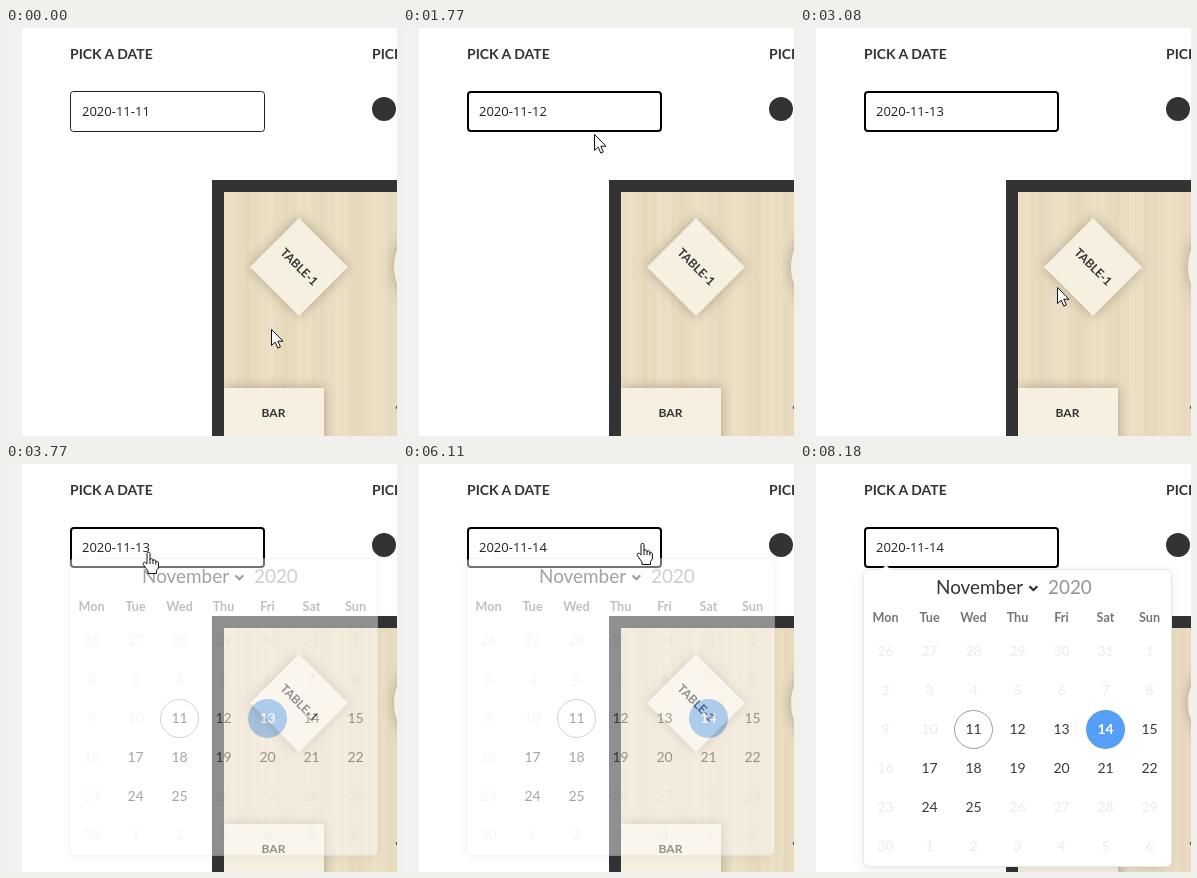
An HTML page for the animation above (8410 ms loop, 391 px wide and 408 px high).

```html
<!DOCTYPE html>
<html lang="en">
<head>
<meta charset="utf-8">
<title>Date picker</title>
<style>
  html, body { margin: 0; height: 100%; overflow: hidden; background: #fff; }
  svg { display: block; width: 391px; height: 408px; }
  text { font-family: Lato, sans-serif; fill: #333; }
  .mid { text-anchor: middle; }
  .title { font-size: 14px; font-weight: 700; }
  .label { font-size: 12px; font-weight: 700; }
  .furniture { fill: #f6f0e1; filter: drop-shadow(0 0 6px rgba(40, 30, 10, .3)); }
  #value { font: 13px "Open Sans", sans-serif; fill: #222; }
  .head { font-size: 18.9px; }
  .weekday { font-size: 12.6px; font-weight: 700; fill: #757575; }
  .day { font-size: 14px; fill: #393939; }
  .off { fill-opacity: .1; }
  .chosen { fill: #fff; font-weight: 700; }
  .panel { filter: drop-shadow(0 3px 6px rgba(0, 0, 0, .08)); }
</style>
</head>
<body>
<svg viewBox="0 0 391 408">
  <rect width="16" height="408" fill="#f1f1f1"/>
  <text class="title" x="64" y="31">PICK A DATE</text>
  <text class="title" x="366" y="31">PICK</text>
  <circle cx="378" cy="81" r="12" fill="#333"/>

  <rect x="206" y="152" width="185" height="256" fill="#333335"/>
  <g id="floor" shape-rendering="crispEdges"></g>
  <path class="furniture" d="M293 190l49 49-49 49-49-49z"/>
  <text class="label mid" transform="translate(293 239) rotate(45)" y="4">TABLE-1</text>
  <circle class="furniture" cx="437" cy="239" r="49"/>
  <rect class="furniture" x="218" y="360" width="100" height="60"/>
  <rect x="206" y="340" width="12" height="68" fill="#333335"/>
  <text class="label mid" x="267.5" y="389">BAR</text>
  <path d="M391 378l-1 1 1 2" stroke="#444" fill="none"/>

  <rect id="field" rx="3" fill="#fff"/>
  <text id="value" x="76" y="88"></text>

  <g id="calendar">
    <rect class="panel" x="63.5" y="105.5" width="308" height="297" rx="5" fill="#fff" stroke="#e6e6e6"/>
    <path d="M81 106l5-5 5 5z" fill="#fff"/>
    <text class="head" x="136" y="130">November</text>
    <path d="M229.5 122.3l3.9 3.9 3.9-3.9" fill="none" stroke="#222" stroke-width="2"/>
    <text class="head" x="248" y="130" style="fill:#959595">2020</text>
    <circle id="hover" r="19.5" fill="#e6e6e6"/>
    <circle cx="173.5" cy="265.5" r="19" fill="none" stroke="#959ea9"/>
    <circle id="disc" cy="265.5" r="19.5" fill="#569ff7"/>
    <g id="days"></g>
  </g>

  <g id="cursors" stroke-linejoin="round">
    <path id="arrow" d="M.5.5v16l3.7-3.4 2.6 6 2.6-1.1-2.6-5.8H12z" fill="#fff" stroke="#111"/>
    <g id="hand" fill="#fff" stroke="#111" transform="translate(-.5 0)">
      <path d="M-1.5 12V1.5c0-1.7 3-1.7 3 0V8c0-2 3-1.7 3 0v1c0-1.8 2.8-1.5 2.8.3v1c0-1.6 2.6-1.3 2.6.5V16L8 18.500V21.500H-.5V19l-4.700-6.500c-.8-2 1.200-3 2.200-1.900z"/>
      <path d="M1.500 8v4m3-3v3m2.800-2v2.500" fill="none"/>
    </g>
    <g id="denied" fill="none" stroke="#bd2f33" stroke-width="2.4">
      <circle r="6.300" fill="#fff" stroke="#7c6a6a" stroke-width="3.600"/>
      <path d="M-4.500-4.500l9 9"/>
      <circle r="6.300"/>
    </g>
  </g>
</svg>
<script>
const LOOP = 8410, STEP = 77, LEAD = 70;
const TODAY = 16, LAST = 30;      // cells of the 11th and the 25th
const OPENING = 300, TRAVEL = 430;

// Calendar [opens, closes]; each close picks the next day
const sessions = [[340, 1260], [1960, 2860], [3732, 4300], [6042, LOOP]];
// Mouse stops [arrival, x, y]
const stops = [
  [0, 265, 301], [330, 200, 88], [760, 189, 236], [1180, 218, 264], [1850, 188, 88],
  [2450, 242, 282], [2720, 262, 266], [3450, 143, 88], [4220, 303, 264], [4760, 160, 85],
  [5520, 295, 390], [6040, 240, 79], [6800, 125, 180], [7200, 82, 346], [7640, 95, 252], [8140, 290, 440]
];

const $ = id => document.getElementById(id);
const set = (el, attrs) => { for (const k in attrs) el.setAttribute(k, attrs[k]); };
const show = (el, on) => { el.style.display = on ? '' : 'none'; };
const add = (parent, tag, attrs) => {
  const el = parent.appendChild(document.createElementNS('http://www.w3.org/2000/svg', tag));
  set(el, attrs);
  return el;
};

const column = i => 85.5 + 44 * (i % 7);
const row = i => 187.5 + 39 * Math.floor(i / 7);
const enabled = i => i >= TODAY && i <= LAST && i % 7 > 0;

function label(cls, x, y, content) {
  const el = add($('days'), 'text', { class: cls + ' mid', x, y });
  el.textContent = content;
  return el;
}

// Wooden boards: broad light bands with fine grain
for (let x = 218; x < 391; x += 3) {
  const light = 1.8 * Math.cos((x - 332) / 5.8) + 1.2 * Math.cos(x / 1.5);
  add($('floor'), 'rect', {
    x, y: 164, width: 3, height: 244,
    fill: `rgb(${233 + light} ${220 + 1.5 * light} ${193 + 2 * light})`
  });
}

'Mon Tue Wed Thu Fri Sat Sun'.split(' ').forEach((name, i) => label('weekday', column(i), 158, name));
const days = Array.from({ length: 42 }, (_, i) => {
  const number = i < 6 ? i + 26 : (i - 6) % 30 + 1;
  return label(enabled(i) ? 'day' : 'day off', column(i), row(i) + 4.5, number);
});

// Moves ease in and out and finish on arrival; the mouse rests in between
function mouseAt(t) {
  const n = stops.findIndex(s => s[0] > t);
  if (n < 0) return stops.at(-1).slice(1);
  const [before, x0, y0] = stops[n - 1], [arrival, x1, y1] = stops[n];
  const span = Math.min(TRAVEL, arrival - before);
  const p = Math.max(0, 1 - (arrival - t) / span), k = p * p * (3 - 2 * p);
  return [x0 + (x1 - x0) * k, y0 + (y1 - y0) * k];
}

const dayAt = (x, y) => days.findIndex((_, i) => Math.hypot(x - column(i), y - row(i)) < 20);

function cursorFor(x, y, open, day) {
  if (x > 64 && x < 259 && y > 63 && y < 104) return 'hand';
  if (open) return day < 0 ? 'arrow' : enabled(day) ? 'hand' : 'denied';
  return Math.abs(x - 293) + Math.abs(y - 239) < 49 ? 'hand' : 'arrow';
}

function drawField(focused, picked) {
  const line = focused ? 2 : 1;
  set($('field'), {
    x: 64 + line / 2, y: 63 + line / 2, width: 195 - line, height: 41 - line,
    stroke: focused ? '#000' : '#222', 'stroke-width': line
  });
  $('value').textContent = '2020-11-' + (11 + picked);
}

function drawCalendar(age, picked, hovered) {
  const shown = 1 - (1 - Math.min(1, age / OPENING)) ** 5;
  set($('calendar'), { opacity: shown, transform: `translate(0 ${20 * (shown - 1)})` });
  set($('disc'), { cx: column(TODAY + picked) });
  days.forEach((el, i) => el.classList.toggle('chosen', i === TODAY + picked));
  show($('hover'), enabled(hovered));
  set($('hover'), { cx: column(hovered), cy: row(hovered) });
}

function draw(t) {
  const session = sessions.find(s => t >= s[0] && t < s[1]);
  const picked = sessions.filter(s => t >= s[1]).length;
  const pressing = session && session[1] < LOOP && t > session[1] - STEP;
  const [x, y] = mouseAt(t);
  const day = session ? dayAt(x, y) : -1;

  drawField(t > 300 && !pressing, picked);
  show($('calendar'), session);
  if (session) drawCalendar(t - session[0], picked, day);

  const cursor = cursorFor(x, y, session, day);
  for (const el of $('cursors').children) show(el, el.id === cursor);
  set($('cursors'), { transform: `translate(${Math.round(x)} ${Math.round(y)})` });
}

const start = performance.now();
function tick() {
  const t = (performance.now() - start) % LOOP;
  draw(Math.max(0, LEAD + Math.floor((t - LEAD) / STEP) * STEP));
  requestAnimationFrame(tick);
}
tick();
</script>
</body>
</html>
```
